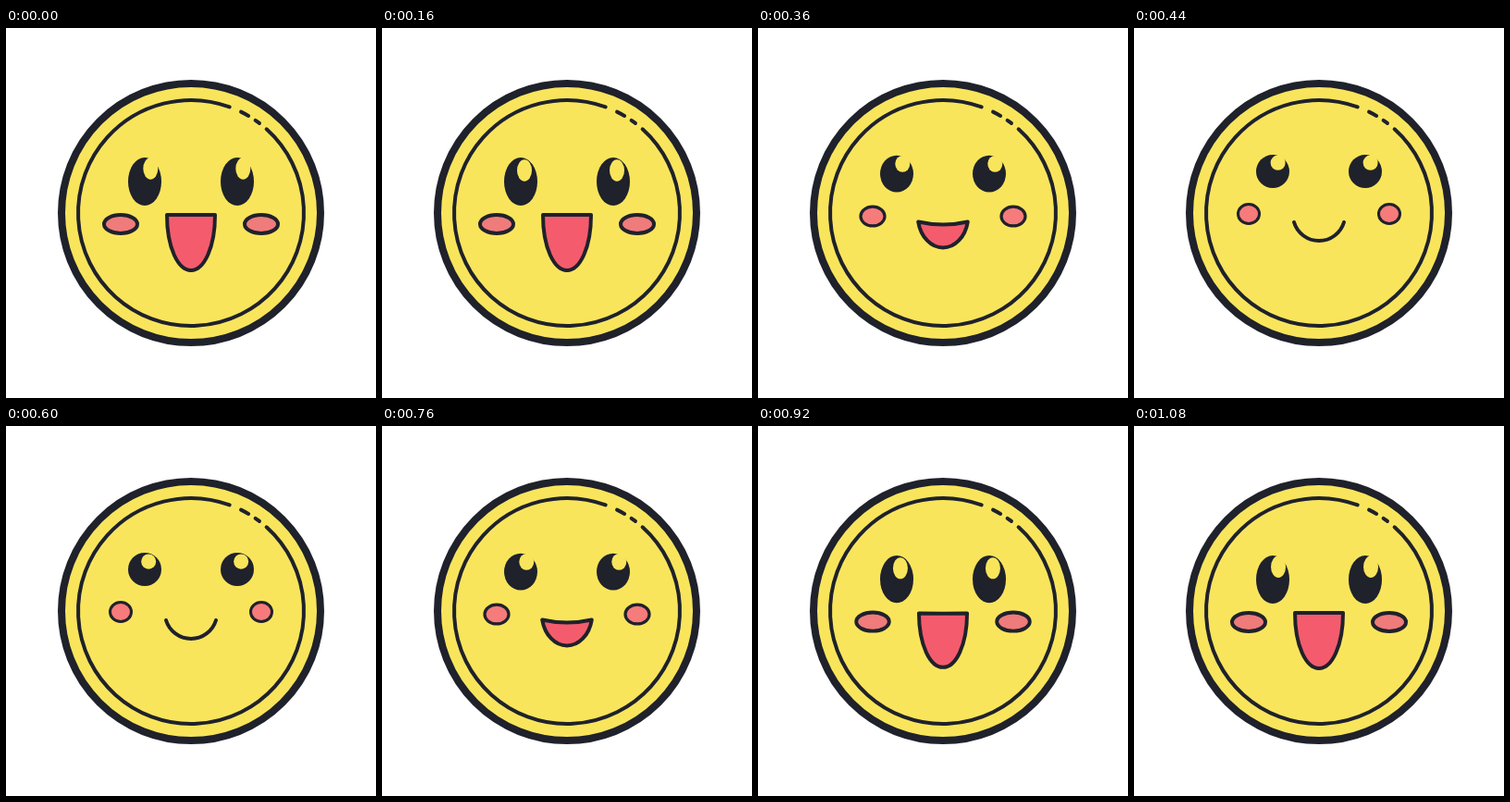
These frames come from a looping animation (400x400 px, 1.12 s). An HTML page with a canvas:

```html
<!DOCTYPE html>
<html lang="en">
<head>
<meta charset="utf-8">
<title>Happy coin</title>
<style>
html, body { margin: 0; width: 100%; height: 100%; overflow: hidden; background: #fff; }
canvas { display: block; width: 400px; height: 400px; }
</style>
</head>
<body>
<canvas id="stage" width="400" height="400"></canvas>
<script>
const ctx = document.getElementById('stage').getContext('2d');
const LOOP = 1120, STEP = 40;
const INK = '#1f212b', GOLD = '#f9e55c', RED = '#f45c6d';

const lerp = (a, b, k) => a + (b - a) * k;
const smooth = (t, from, to) => {
  const u = Math.min(1, Math.max(0, (t - from) / (to - from)));
  return u * u * (3 - 2 * u);
};
const rad = deg => deg * Math.PI / 180;

function ellipse(x, y, rx, ry, fill, width) {
  ctx.beginPath();
  ctx.ellipse(x, y, rx, ry, 0, 0, Math.PI * 2);
  ctx.fillStyle = fill;
  ctx.fill();
  if (width) stroke(width);
}

function stroke(width) {
  ctx.lineWidth = width;
  ctx.strokeStyle = INK;
  ctx.stroke();
}

function ringArc(from, to) {
  ctx.beginPath();
  ctx.arc(200, 200, 122, rad(from), rad(to));
  stroke(4);
}

function coin() {
  ellipse(200, 200, 140, 140, GOLD, 8);
  ringArc(-48, 290);
  ringArc(-63.7, -59.4);
  ringArc(-55.2, -52.7);
}

function eye(x, open, shine) {
  const y = lerp(155, 166, open), ry = lerp(18, 26, open);
  ellipse(x, y, 18, ry, INK);
  ellipse(x + 5.1 + 1.2 * shine, y - ry * (0.5 + 0.04 * shine), 8, ry * 0.45, GOLD);
}

function cheek(x, open) {
  const fill = `rgb(${lerp(248, 239, open)}, 123, 123)`;
  ellipse(x, lerp(201, 212, open), lerp(11.5, 18, open), lerp(10.5, 10, open), fill, lerp(3, 4, open));
}

function mouth(open) {
  const half = lerp(27, 26, open);
  const top = 210 - 8 * open * open;
  const bottom = lerp(230, 262, open);
  const side = lerp(23.4, 26, open), tip = lerp(12.4, 14, open);
  const sideY = lerp(top, bottom, 0.59);
  ctx.beginPath();
  ctx.moveTo(200 - half, top);
  ctx.bezierCurveTo(200 - side, sideY, 200 - tip, bottom, 200, bottom);
  ctx.bezierCurveTo(200 + tip, bottom, 200 + side, sideY, 200 + half, top);
  if (open > 0.02) {
    // upper lip sags a little until fully open
    ctx.quadraticCurveTo(200, top + 8 * (1 - open), 200 - half, top);
    ctx.closePath();
    ctx.fillStyle = RED;
    ctx.fill();
  }
  stroke(4);
}

function draw(t) {
  const open = 1 - smooth(t, 168, 448) + smooth(t, 672, 952);
  const shine = Math.cos(t / LOOP * 6 * Math.PI);
  ctx.fillStyle = '#fff';
  ctx.fillRect(0, 0, 400, 400);
  ctx.lineCap = ctx.lineJoin = 'round';
  coin();
  for (const x of [150, 250]) eye(x, open, shine);
  for (const x of [124, 276]) cheek(x, open);
  mouth(open);
}

function tick() {
  const t = performance.now() % LOOP;
  draw(Math.floor(t / STEP) * STEP);
  requestAnimationFrame(tick);
}
tick();
</script>
</body>
</html>
```
